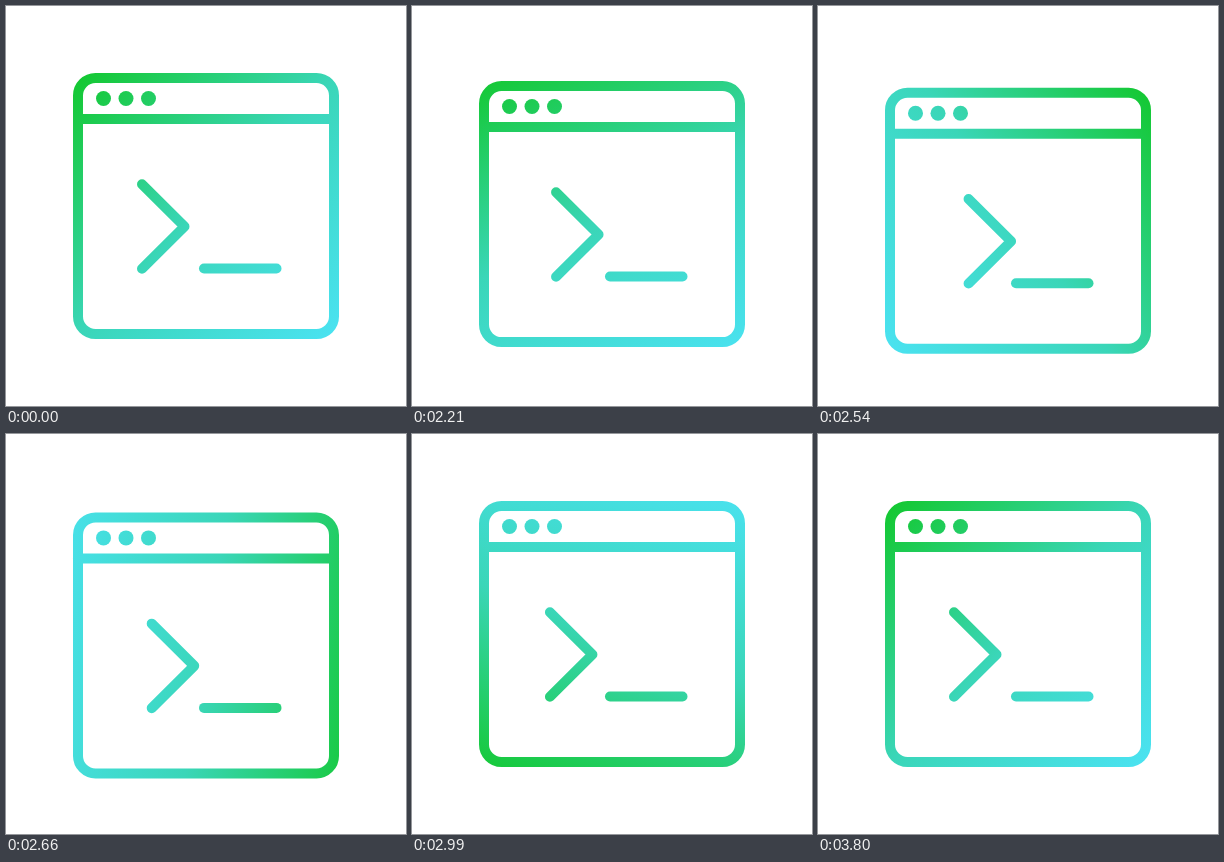
These frames come from a looping animation (400 by 400 pixels, 3860 ms). An HTML page:

```html
<!DOCTYPE html>
<html lang="en">
<head>
<meta charset="utf-8">
<title>Terminal window</title>
<style>
  html, body { margin: 0; width: 100%; height: 100%; overflow: hidden; background: #fff; }
  svg { display: block; width: 100vw; height: 100vh; }
</style>
</head>
<body>
<svg viewBox="0 0 400 400">
  <defs>
    <linearGradient id="tint" gradientUnits="userSpaceOnUse">
      <stop offset="0" stop-color="#14c832"/>
      <stop offset="0.5" stop-color="#3ad6b8"/>
      <stop offset="1" stop-color="#4ae2f0"/>
    </linearGradient>
  </defs>
  <g id="icon" fill="none" stroke="url(#tint)" stroke-width="10" stroke-linecap="round" stroke-linejoin="round">
    <rect x="72" y="72" width="256" height="256" rx="17.5"/>
    <path d="M72 113H328"/>
    <g fill="url(#tint)" stroke="none">
      <circle cx="97.5" cy="92.5" r="7.5"/>
      <circle cx="120" cy="92.5" r="7.5"/>
      <circle cx="142.5" cy="92.5" r="7.5"/>
    </g>
    <path id="chevron" d="M136 178.25L178.5 220.5L136 262.75"/>
    <path d="M198 262.5H270.5"/>
  </g>
</svg>
<script>
const LOOP = 3860, STEP = 30, FIRST = 2030, LAST = 3800;
const SHIFT = 15, RADIUS = 180, CENTER = 200;

// Clockwise turn of the gradient's green end: [ms, degrees]
const TURN = [[2000, 0], [2360, 45], [2540, 100], [2780, 186], [3290, 319], [3620, 360]];

const tint = document.getElementById('tint');
const icon = document.getElementById('icon');
const chevron = document.getElementById('chevron');

function ease(t, from, to) {
  const u = Math.min(1, Math.max(0, (t - from) / (to - from)));
  return u * u * (3 - 2 * u);
}

// Out over 400 ms, a 100 ms rest, then back
function pulse(t, start, back) {
  return SHIFT * (ease(t, start, start + 400) - ease(t, start + 500, start + 500 + back));
}

function slope(i) {
  if (i === 0 || i === TURN.length - 1) return 0;
  const [a, b] = [TURN[i - 1], TURN[i + 1]];
  return (b[1] - a[1]) / (b[0] - a[0]);
}

// Smooth cubic through the turn table
function turnAt(t) {
  const end = TURN.length - 1;
  if (t <= TURN[0][0]) return TURN[0][1];
  if (t >= TURN[end][0]) return TURN[end][1];
  const i = TURN.findIndex(k => k[0] > t) - 1;
  const [t0, a0] = TURN[i], [t1, a1] = TURN[i + 1];
  const h = t1 - t0, u = (t - t0) / h, v = 1 - u;
  return v * v * ((1 + 2 * u) * a0 + u * h * slope(i))
       + u * u * ((1 + 2 * v) * a1 - v * h * slope(i + 1));
}

function draw(t) {
  const angle = (turnAt(t) - 135) * Math.PI / 180;
  const dx = RADIUS * Math.cos(angle), dy = RADIUS * Math.sin(angle);
  tint.setAttribute('x1', CENTER + dx);
  tint.setAttribute('y1', CENTER + dy);
  tint.setAttribute('x2', CENTER - dx);
  tint.setAttribute('y2', CENTER - dy);
  icon.setAttribute('transform', `translate(0 ${pulse(t, 2000, 500)})`);
  chevron.setAttribute('transform', `translate(${pulse(t, 2000, 400) + pulse(t, 2900, 400)} 0)`);
}

function stepped(t) {
  if (t < FIRST) return 0;
  return Math.min(LAST, FIRST + Math.floor((t - FIRST) / STEP) * STEP);
}

const begin = performance.now();
function tick() {
  draw(stepped((performance.now() - begin) % LOOP));
  requestAnimationFrame(tick);
}
tick();
</script>
</body>
</html>
```
